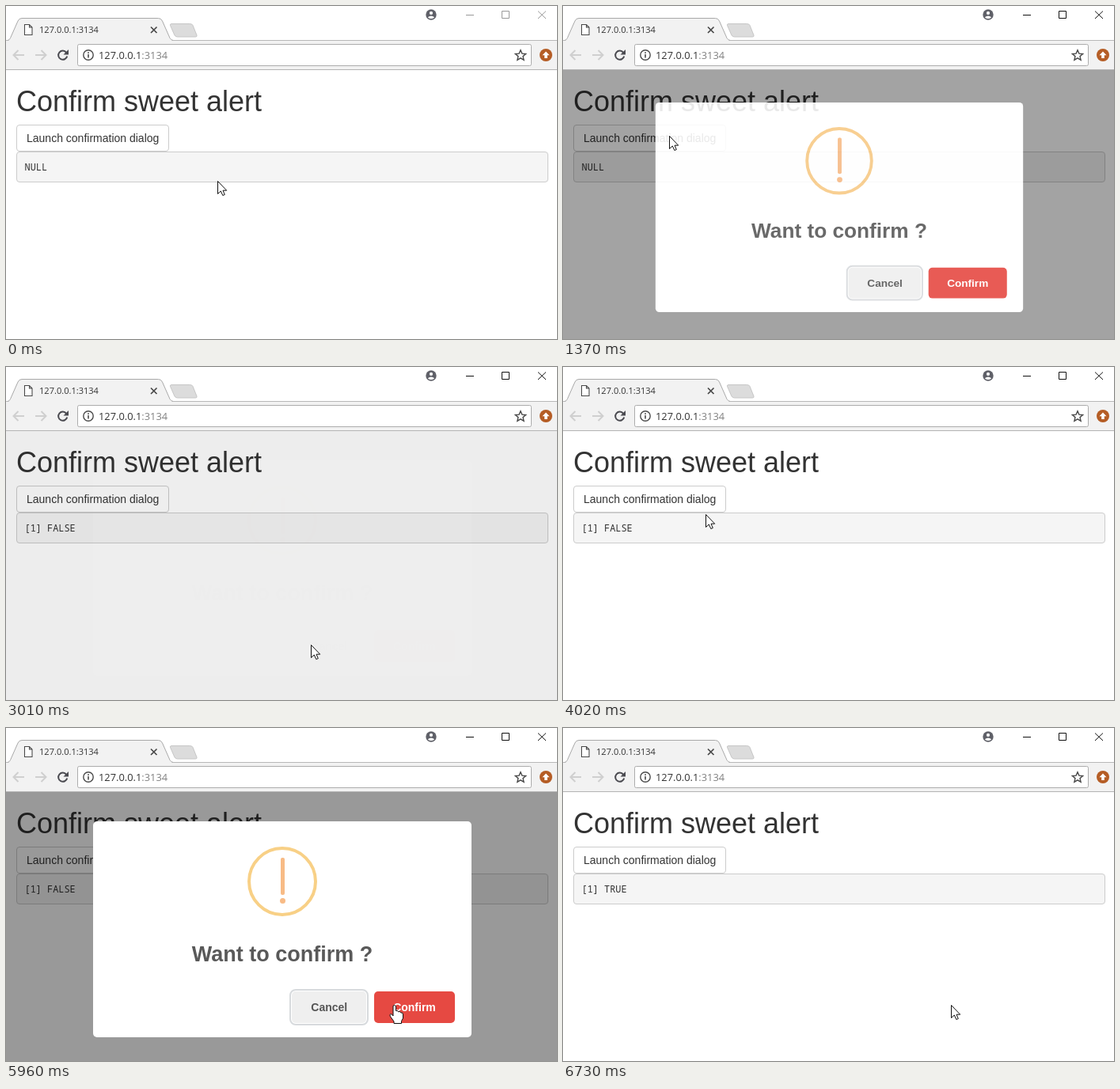
Write an HTML page that moves like this. It is 696 by 421 pixels and loops after 7.43 s.

```html
<!DOCTYPE html>
<html lang="en">
<head>
<meta charset="utf-8">
<title>Confirm sweet alert</title>
<style>
  html, body { margin: 0; width: 100%; height: 100%; overflow: hidden; background: #fff; }
  svg { display: block; width: 100%; height: 100%; }
  text { font-family: "Liberation Sans", Arial, sans-serif; fill: #333; white-space: pre; }
  .ui { font-family: "Open Sans", "Noto Sans", sans-serif; }
  .mono { font-family: "Noto Sans Mono", "DejaVu Sans Mono", monospace; font-size: 11.9px; }
  .bold { font-weight: 700; text-anchor: middle; }
  .line { fill: none; }
</style>
</head>
<body>
<svg viewBox="0 0 696 421">
  <rect width="696" height="421" fill="#fff"/>

  <!-- page -->
  <text x="13" y="133" font-size="36">Confirm sweet alert</text>
  <rect x="13.5" y="184.5" width="671" height="38" rx="3.5" fill="#f5f5f5" stroke="#ccc"/>
  <text id="value" class="mono" x="23.5" y="208"></text>
  <rect id="launch" x="13.5" y="150.5" width="192" height="33" rx="3.5"/>
  <rect id="ring" class="line" x="13" y="150" width="193" height="34" rx="3.5" stroke="#4d90fe" stroke-width="2" opacity=".75"/>
  <text x="26" y="172" font-size="14">Launch confirmation dialog</text>

  <!-- dialog -->
  <g id="overlay">
    <rect y="81" width="696" height="340" fill="#000" fill-opacity=".4"/>
    <g id="modal">
      <rect x="110" y="118" width="478" height="273" rx="5" fill="#fff"/>
      <circle id="icon" class="line" cx="349" cy="194" r="42" stroke-width="4"/>
      <rect x="347" y="164" width="5" height="47" rx="2" fill="#f8bb86"/>
      <circle cx="349.5" cy="218.5" r="3.5" fill="#f8bb86"/>
      <text class="bold" x="349" y="294.5" font-size="27" style="fill:#595959">Want to confirm ?</text>
      <rect x="359" y="331" width="98" height="44" rx="7" class="line" stroke="#d7dadd" stroke-width="2"/>
      <rect id="cancel" x="361" y="333" width="94" height="40" rx="5"/>
      <text class="bold" x="408.3" y="358" font-size="14" style="fill:#555">Cancel</text>
      <rect id="confirm" x="465" y="333" width="102" height="40" rx="5"/>
      <text class="bold" x="516" y="358" font-size="14" style="fill:#fff">Confirm</text>
    </g>
  </g>

  <!-- browser window -->
  <rect width="696" height="81" fill="#fff"/>
  <rect y="43" width="696" height="38" fill="#f2f2f2"/>
  <path d="M0 43.5H696" stroke="#b8b8b8"/>
  <path d="M0 80.5H696" stroke="#b4b4b4"/>
  <path d="M209 22.5H232.500Q235 22.500 236 24.500L241 37Q241.500 39 239.500 39H216.500Q214 39 213 37L207.500 24.500Q207 22.500 209 22.500Z" fill="#dcdcdc" stroke="#c6c6c6"/>
  <path d="M2 44Q4.500 43.500 5.500 40.500L15 19Q16.500 15.500 20 15.500H192.500Q196 15.500 197.500 19L207 40.500Q208.500 43.500 211 44Z" fill="#f2f2f2"/>
  <path class="line" d="M2 43.500Q4.500 43 5.500 40.500L15 19Q16.500 15.500 20 15.500H192.500Q196 15.500 197.500 19L207 40.500Q208.500 43 211 43.500" stroke="#a9a9a9"/>
  <path d="M23.500 23.500H29.500L33 27V36.500H23.500ZM29.500 23.500V27H33" fill="#fff" stroke="#4a4a4a" stroke-width="1.1"/>
  <text class="ui" x="42" y="34" font-size="11.06">127.0.0.1:3134</text>
  <path d="M183 26.500l7.500 7.500m0-7.500l-7.500 7.500" stroke="#484848" stroke-width="1.7"/>

  <g class="line" stroke-width="2">
    <path d="M23 62H10M15.500 56l-6 6 6 6M37 62H50M44.500 56l6 6-6 6" stroke="#cfcfcf"/>
    <path d="M76.200 58.800A5.600 5.600 0 1 0 77.200 63.500" stroke="#4a4a50"/>
  </g>
  <path d="M79 55V61.500H72.500Z" fill="#4a4a50"/>
  <rect x="90.500" y="48.500" width="573" height="27" rx="2" fill="#fff" stroke="#acacac"/>
  <circle class="line" cx="104" cy="62" r="6.200" stroke="#4a4a4a" stroke-width="1.400"/>
  <path d="M104 61V65.500M104 58.300V59.900" stroke="#4a4a4a" stroke-width="1.600"/>
  <text class="ui" x="117" y="67" font-size="12.850">127.0.0.1<tspan fill="#808080">:3134</tspan></text>
  <path class="line" d="M650 55.800l1.900 4.300 4.700.4-3.600 3.100 1.100 4.600-4.100-2.400-4.100 2.400 1.100-4.600-3.600-3.100 4.700-.4z" stroke="#484848" stroke-width="1.400"/>
  <circle cx="682" cy="62" r="8" fill="#b55d25"/>
  <path d="M682 57.500l4.500 4.700H683.800V66H680.200V62.200H677.500Z" fill="#fff"/>

  <circle cx="537" cy="11" r="6.700" fill="#5f6068"/>
  <circle cx="537" cy="8.900" r="2.100" fill="#fff"/>
  <path d="M532.800 14.200Q537 10.600 541.200 14.200Q537 18 532.800 14.200Z" fill="#fff"/>
  <path id="controls" class="line" d="M581 11.500H591M626.500 6.500H635.500V15.500H626.500ZM672 6.500l10 9.500m0-9.500l-10 9.500"/>

  <g id="cursor" fill="#fff" stroke="#111" stroke-linejoin="round">
    <path id="arrow" d="M.5.500V16.500L4.300 13L6.800 18.500L9.300 17.500L7 12.200H11.700Z"/>
    <path id="hand" d="M-1 2Q-1 .5.500.500T2.500 2V7.500Q5 6.500 5.500 8.800Q8 7.500 8.700 10Q11.500 9.300 11.500 12V17L9.500 20.500V23.500H0V21L-4.500 14.800Q-6 12 -4 11.600Q-2.500 11.500 -1 14Z"/>
  </g>
</svg>
<script>
const LOOP = 7430;
const $ = id => document.getElementById(id);
const set = (id, attrs) => {
  for (const k in attrs) $(id).setAttribute(k, attrs[k]);
};

const BURSTS = [
  [290, 830, 8], [1070, 1600, 8], [1750, 2450, 10], [2770, 3160, 6],
  [3480, 4170, 10], [4260, 4260, 1], [4410, 4410, 1], [4580, 4890, 5],
  [5040, 5720, 10], [5800, 5960, 3], [6350, 6730, 6]
];
// Pointer moves: start, end, target x, target y.
const MOVES = [
  [213, 830, 134, 164], [1672, 2450, 385, 351], [3403, 4170, 169, 177],
  [4180, 4260, 167, 171], [4964, 5720, 457, 331], [5720, 5960, 490, 350]
];
const DIALOGS = [
  { open: 1187, close: 2846, press: 2770, down: 1070, button: "cancel" },
  { open: 4556, close: 6424, press: 6350, down: 4410, button: "confirm" }
];
const BUTTONS = {
  launch: { box: [13, 150, 206, 184], fill: ["#fff", "#e6e6e6", "#d4d4d4"] },
  cancel: { box: [361, 333, 455, 373], fill: ["#efefef", "#ececec", "#d7d7d7"] },
  confirm: { box: [465, 333, 567, 373], fill: ["#e64942", "#e64942", "#cf423d"] }
};
const POP = [[0, 1], [.01, .5], [.45, 1.05], [.8, .95], [1, 1]];

const clamp = x => Math.min(1, Math.max(0, x));
const mix = (a, b, u) => a + (b - a) * u;

// CSS "ease": cubic-bezier(.25, .1, .25, 1)
function ease(x) {
  x = clamp(x);
  const bez = (a, b, s) => 3 * a * s * (1 - s) ** 2 + 3 * b * s * s * (1 - s) + s ** 3;
  let lo = 0, hi = 1;
  for (let i = 0; i < 24; i++) {
    const mid = (lo + hi) / 2;
    if (bez(.25, .25, mid) < x) lo = mid; else hi = mid;
  }
  return bez(.1, 1, lo);
}

const glide = u => u < .5 ? .5 * (2 * u) ** 2.5 : 1 - .5 * (2 - 2 * u) ** 2.5;

function capture(t) {
  let shown = 0;
  for (const [a, b, n] of BURSTS) {
    if (t < a) break;
    const step = n > 1 ? (b - a) / (n - 1) : 1;
    shown = a + step * Math.min(n - 1, Math.floor((t - a) / step + .15));
  }
  return shown;
}

function pointer(t) {
  let x = 267, y = 221;
  for (const [a, b, tx, ty] of MOVES) {
    const u = glide(clamp((t - a) / (b - a)));
    x = mix(x, tx, u);
    y = mix(y, ty, u);
  }
  return [Math.round(x), Math.round(y)];
}

function popScale(u) {
  if (u >= 1) return 1;
  const i = POP.findIndex(p => p[0] > u);
  const [a, from] = POP[i - 1], [b, to] = POP[i];
  return mix(from, to, ease((u - a) / (b - a)));
}

function drawDialog(t, d) {
  const age = t - d.open, gone = t - d.close;
  const fade = ms => gone > 0 ? 1 - ease(gone / ms) : ease(age / ms);
  const s = popScale(age / 300);
  const beat = age / 750 % 2;
  const pulse = ease(beat < 1 ? beat : 2 - beat);
  set("overlay", { opacity: fade(300) });
  set("modal", {
    opacity: fade(200),
    transform: `translate(349 254.5) scale(${s}) translate(-349 -254.5)`
  });
  set("icon", { stroke: `rgb(248,${Math.round(mix(212, 187, pulse))},134)` });
}

function draw(time) {
  const t = capture(time);
  const [x, y] = pointer(t);
  const open = DIALOGS.find(d => t >= d.open && t < d.close);
  const shown = DIALOGS.find(d => t >= d.open && t < d.close + 300);
  const pressed = DIALOGS.some(d => t >= d.down && t < d.open);

  set("overlay", { display: shown ? "inline" : "none" });
  if (shown) drawDialog(t, shown);

  let over = null;
  for (const id in BUTTONS) {
    const { box: [l, top, r, bottom], fill } = BUTTONS[id];
    const live = id === "launch" ? !shown : open;
    const hover = live && x >= l && x < r && y >= top && y < bottom;
    const down = id === "launch" ? pressed : open && open.button === id && t >= open.press;
    if (hover) over = id;
    set(id, { fill: fill[down ? 2 : hover ? 1 : 0] });
  }
  set("launch", { stroke: pressed ? "#8c8c8c" : over === "launch" ? "#adadad" : "#ccc" });
  set("ring", { display: pressed ? "inline" : "none" });

  $("value").textContent = t < DIALOGS[0].close ? "NULL"
    : t < DIALOGS[1].close ? "[1] FALSE" : "[1] TRUE";
  set("controls", { stroke: t < 1070 ? "#999" : "#111" });
  set("cursor", { transform: `translate(${x} ${y})` });
  set("arrow", { display: over ? "none" : "inline" });
  set("hand", { display: over ? "inline" : "none" });
}

const start = performance.now();
function tick() {
  draw((performance.now() - start) % LOOP);
  requestAnimationFrame(tick);
}
tick();
</script>
</body>
</html>
```
